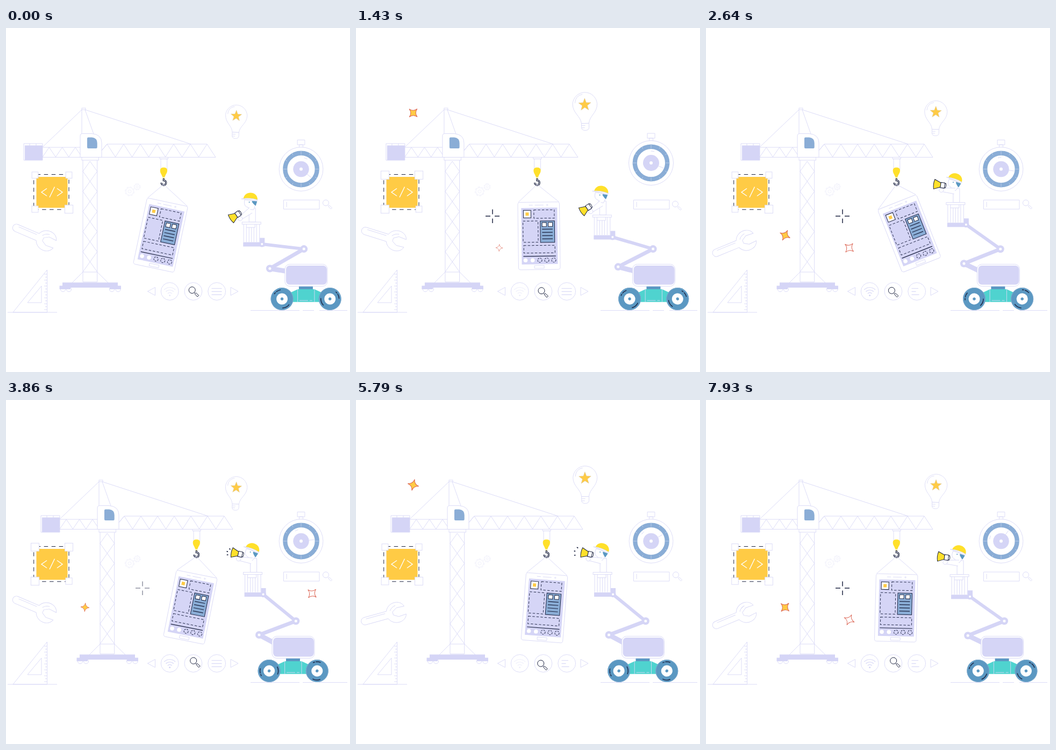
Write an HTML page that moves like this. It is 640 by 640 pixels and loops after 8000 ms.

```html
<!DOCTYPE html>
<html lang="en">
<head>
<meta charset="utf-8">
<title>Building an app</title>
<style>
html, body { margin: 0; width: 100%; height: 100%; overflow: hidden; background: #fff; }
svg { display: block; width: 100vw; height: 100vh; }
.l { fill: none; stroke: #d9d9f6; stroke-width: .9; }
.w { fill: #fff; stroke: #d9d9f6; stroke-width: .9; }
.f { fill: #d5d5f6; }
.b { fill: #8aadd6; }
.s { fill: #5b98c2; }
.n { fill: none; stroke: #1c2340; stroke-width: 1; }
.d { fill: none; stroke: #2b3150; stroke-width: 1; stroke-dasharray: 4.5 3; }
.pale { fill: none; stroke: #f0f0fb; stroke-width: .9; }
.spark { stroke: #dc6655; stroke-width: 1; }
</style>
</head>
<body>
<svg viewBox="0 0 640 640">
  <!-- set square -->
  <path class="l" d="M3 529H95M76.5 450L13 529H76.5ZM66 480L40 511H66Z"/>
  <path class="l" id="ruler"/>

  <!-- wrench -->
  <g id="wrench">
    <path class="w" d="M-17 -7H-60A7 7 0 0 0 -60 7H-17C-13 16 -4 20 5 18.5C12 17 16 13 17.5 7.5L3 8.5L-6 3V-3L3 -8.5L17.5 -7.5C16 -13 12 -17 5 -18.5C-4 -20 -13 -16 -17 -7Z"/>
    <path class="l" d="M-57 -3.5H-20M-10 -6Q-6 -12 2 -13"/>
  </g>

  <!-- code tile -->
  <rect x="56.5" y="277" width="58" height="57.5" fill="#ffcb45"/>
  <rect x="51.7" y="272.5" width="65.3" height="65.3" class="n" stroke-dasharray="7.5 6.5" stroke-dashoffset="-5"/>
  <path d="M76 298.5L66 305.5L76 312.5M90.5 295.5L81 315M95 298.5L105 305.5L95 312.5" fill="none" stroke="#fff" stroke-width="1.4"/>
  <g id="handles"></g>

  <!-- gears -->
  <g id="gearA"><circle r="8.5" class="pale" stroke-dasharray="4.2 2.5"/><circle r="7" class="pale"/><circle r="3" class="pale"/></g>
  <g id="gearB"><circle r="6" class="pale" stroke-dasharray="3 1.7"/><circle r="4.8" class="pale"/><circle r="2" class="pale"/></g>

  <!-- crane -->
  <g id="crane">
    <path class="l" d="M141 152L68 221.5M147 152L344 216M141 152V197M147 152L163 197"/>
    <rect class="w" x="141" y="149" width="7" height="3"/>
    <path class="l" d="M33 215H68V246H33ZM44 215V219M56 215V219M68 222H138M68 240.5H390M178 228L188 216H374L390 240.5"/>
    <rect class="f" x="35" y="218.5" width="33" height="27.5"/>
    <path class="l" id="truss"/>
    <path class="w" d="M138 240.5V201Q138 196.5 142.5 196.5H160Q178 198 178 214V240.5Z"/>
    <path class="b" d="M153 203.5H160Q169.5 204.5 169.7 214V222Q169.7 224 167.7 224H153Q151 224 151 222V205.5Q151 203.5 153 203.5Z"/>
    <rect class="w" x="141" y="240.5" width="31.5" height="5.5"/>
    <path class="l" d="M143 246V472.5H169.7V246M143 454H169.7M143 454L123 474M169.7 454L190 474"/>
    <g id="rollers"></g>
    <path class="f" d="M105 473.5H208V479.5H214V486H193V483H120V486H99.5V479.5H105Z"/>
  </g>
  <g id="trolley">
    <path class="w" d="M286 240.5H301.5V243.5H286ZM288 243.5H299.7V264H288Z"/>
    <path d="M286.7 265Q286.7 259.5 293.3 259.5Q300 259.5 300 265C300 270 297 272 295.5 277H291C289.5 272 286.7 270 286.7 265Z" fill="#ffe02a"/>
    <rect x="291.2" y="277" width="4" height="3" fill="#f3e9a0"/>
    <path class="n" id="hook" d="M293.3 280V283.5A4.4 4.4 0 1 1 289 287.8" style="stroke-width:3.2"/>
    <path d="M293.3 281V283.5A4.4 4.4 0 1 1 289.2 288" fill="none" stroke="#fff"/>
  </g>
  <path class="l" id="ropes"/>

  <!-- phone, pivot at its top centre -->
  <g id="phone">
    <rect class="w" x="-38.7" width="77.5" height="125.5" rx="4"/>
    <path class="l" d="M-18 5.5H-11M-7 5.5H9M-9 118H9V123H-9Z"/>
    <circle class="l" cx="16" cy="5.5" r="1.2"/>
    <rect class="f" x="-32.5" y="10.5" width="67" height="105"/>
    <rect class="n" x="-28.5" y="15" width="14" height="14" style="fill:#fff"/>
    <rect x="-24.5" y="19" width="6" height="6" fill="#ffcb45"/>
    <path class="d" d="M-9 14.5H29V30H-9ZM-29.5 35H-1.5V74.5H-29.5ZM-28.5 80.5H29.5V94.5H-28.5Z"/>
    <rect class="n" x="2.7" y="35" width="26.5" height="40" style="fill:#8aadd6"/>
    <path class="n" d="M6 38H14V45.5H6ZM17.5 38H25.5V45.5H17.5Z" style="fill:#fff"/>
    <path class="n" d="M6 50.5H25.5M6 56.5H25.5M6 62.5H25.5M6 68.5H25.5M-29.5 100.5H31" style="stroke-width:1.2"/>
    <circle cx="-25.5" cy="108" r="3.8" fill="#fff"/><circle cx="-12.3" cy="108" r="3.8" fill="#fff"/>
    <g class="d" style="stroke-dasharray:3 1.7"><circle cx="1" cy="108" r="4"/><circle cx="14" cy="108" r="4"/><circle cx="27" cy="108" r="4"/></g>
  </g>

  <g id="sparks"></g>
  <path class="n" id="cross" d="M241 350H250M258 350H267M254 337.5V346.5M254 354.5V363" style="stroke-width:1.5"/>

  <!-- navigation -->
  <path class="l" d="M277.5 482.5L263.5 490L277.5 497.5ZM418 482.5L432 490L418 497.5Z"/>
  <g class="w"><circle cx="304.7" cy="490" r="16.4"/><circle cx="348.4" cy="490" r="16.4"/><circle cx="392.2" cy="490" r="16.4"/></g>
  <g id="wifi"><path class="l" style="stroke-width:1.2" d="M300.7 494A5.6 5.6 0 0 1 308.7 494M297.5 490.5A10.2 10.2 0 0 1 311.9 490.5M294.3 487A14.8 14.8 0 0 1 315.1 487"/><circle class="f" cx="304.7" cy="497.5" r="1.5"/></g>
  <g id="lens"><circle class="n" r="6"/><path class="n" d="M4 4.5L5.5 6M5 7L7 5L12.5 10L10 12.5Z"/></g>
  <path class="l" id="menu" style="stroke-width:1.2"/>

  <!-- bulb, pivot at its foot -->
  <g id="bulb">
    <path class="w" d="M-7 -13C-8 -27 -22.5 -32 -22.5 -49A22.8 23 0 0 1 23 -49C23 -32 8 -27 7 -13Z"/>
    <path class="w" d="M-7 -13H7V-6Q7 0 0 0Q-7 0 -7 -6Z"/>
    <path class="l" d="M-7 -9H0M-7 -5H-1M-18 -51Q-17 -65 -4 -67"/>
    <path id="star" fill="#ffcb45" stroke="#d9c9a8" stroke-width=".6"/>
  </g>

  <!-- stopwatch -->
  <g id="watch">
    <path class="w" d="M-3.5 -46H3.5V-40H-3.5ZM-7 -55H7V-46H-7Z"/>
    <circle class="w" r="41.5"/>
    <circle r="30.2" fill="none" stroke="#8aadd6" stroke-width="8.4"/>
    <path id="ticks" stroke="#c5d3ee" stroke-width=".8"/>
    <circle class="f" r="15"/><circle r="3" fill="#fff"/>
    <path class="l" id="hand" d="M14 0H25M-9 -20A22 22 0 0 1 -3 -22"/>
  </g>

  <!-- search field -->
  <path class="l" d="M516.5 320H583V337H516.5ZM522 323.5V333"/>
  <g id="lensSmall"><circle class="l" r="5.5"/><path class="l" d="M4 4L5 5M4.5 6.5L6.5 4.5L11.5 9.5L9.5 11.5Z"/></g>

  <!-- lift -->
  <path class="l" d="M455 525.5H546M552 525.5H573M583 525.5H635"/>
  <g id="lift">
    <g fill="none" stroke="#d5d5f6">
      <path id="boomA" stroke-width="9"/><path id="boomB" stroke-width="7"/><path id="boomC" stroke-width="6"/>
    </g>
    <g id="joints"></g>
    <rect class="w" x="519" y="439.5" width="79" height="41" rx="9"/>
    <rect class="f" x="521" y="442" width="76" height="35.5" rx="7"/>
    <rect class="s" x="545" y="481" width="26" height="5.5"/>
    <path fill="#4fd3cf" d="M530 492L543 486H574L587 492V509.7H530Z"/>
    <path class="l" d="M542.7 486V509.7M574 486V509.7M546 507H562M565 507H570"/>
    <g id="wheelA"></g><g id="wheelB"></g>

    <!-- basket and worker, origin at the platform joint -->
    <g id="basket">
      <path class="w" d="M-24 -41V-64Q-23 -67 -19 -67H-12V-41Z"/>
      <g id="head">
        <path class="w" d="M-32 -83V-77Q-31 -70 -24 -69.5L-22 -66H-14L-12 -73V-83Z"/>
        <path class="s" d="M-18 -82L-8.5 -82L-10.5 -73.5Q-14 -75 -18 -80Z"/>
        <circle class="s" cx="-23" cy="-79.5" r="1"/>
        <path d="M-34.5 -85C-33 -101 -9 -101 -8 -85Z" fill="#ffe02a"/>
        <path class="w" d="M-38 -84.5Q-22 -88.5 -7.5 -84.5Q-8 -82.5 -12 -83Q-24 -85 -38 -84.5Z"/>
      </g>
      <g id="arm">
        <path class="w" d="M1 -5L-22 -2V5L0 6"/>
        <circle class="w" cx="-24.5" cy="2" r="4.2"/>
        <path class="n" style="fill:#ffe02a" d="M-39 -16Q-41.5 -7 -39 2L-27 -3V-11Z"/>
        <path class="n" style="fill:#fff" d="M-27 -12H-19.5V-2H-27ZM-19.5 -11H-17.5Q-16 -7 -17.5 -3H-19.5"/>
        <path class="n" id="sound" style="stroke-width:1.7" d="M-43 -12L-49.8 -14.6M-46.5 -7L-53.5 -6.7M-45 -1.4L-51.5 1.1"/>
      </g>
      <path class="l" d="M-34 -37V-4M-29 -37V-4M-24 -31V-4M-19.5 -31V-4M-15 -31V-4M-10 -37V-4M-4.5 -37V-4M-29 -31H-13V-37"/>
      <rect class="w" x="-37" y="-41" width="35" height="4"/>
      <path class="f" d="M-35 -3.5H-4V-11.5H5V4.5H-35Z"/>
      <circle r="5.5" class="f"/><circle r="2" fill="#fff"/>
    </g>
  </g>
</svg>
<script>
const LOOP = 8000, RAD = Math.PI / 180, TURN = 2 * Math.PI;
const $ = id => document.getElementById(id);
const set = (el, name, value) => (typeof el === 'string' ? $(el) : el).setAttribute(name, value);
const place = (el, x, y, angle = 0, scale = 1) =>
  set(el, 'transform', `translate(${x} ${y}) rotate(${angle}) scale(${scale})`);
const range = n => [...Array(n).keys()];
const polar = (r, deg) => [r * Math.cos(deg * RAD), r * Math.sin(deg * RAD)];
const add = (p, q) => [p[0] + q[0], p[1] + q[1]];
const line = (...points) => 'M' + points.join('L');

// Motion rules
const mix = (a, b, u) => a + (b - a) * u;
const clamp = u => Math.min(1, Math.max(0, u));
const smooth = u => (u = clamp(u), u * u * (3 - 2 * u));
const ease = (t, from, to) => smooth((t - from) / (to - from));
const bump = (t, peak, reach) => smooth(1 - Math.abs(t - peak) / reach);
const wave = (t, period, peak) => Math.cos(TURN * (t - peak) / period);

// Repeated still parts
set('ruler', 'd', range(13).map(i => `M${i % 2 ? 73 : 71} ${458 + i * 5.5}H76.5`).join(''));
const zigzag = (count, point) => line(...range(count).map(i => point(i, i % 2)));
set('truss', 'd', 'M178 228L188 216' +
  zigzag(7, (i, odd) => [68 + i * 12.2, odd ? 222 : 240]) +
  zigzag(13, (i, odd) => [188 + i * 15.5, odd ? 240 : 216]) +
  zigzag(12, (i, odd) => [odd ? 143 : 156.3, 248 + i * 18.7]) +
  zigzag(12, (i, odd) => [odd ? 169.7 : 156.3, 248 + i * 18.7]));
$('rollers').innerHTML = [106, 117, 197, 208.5].map(x => `<circle class="w" cx="${x}" cy="486" r="4.6"/>`).join('');
set('star', 'd', line(...range(10).map(i => add([0, -47.5], polar(i % 2 ? 5 : 12, i * 36 - 90)))) + 'Z');
set('ticks', 'd', range(12).map(i => line(polar(i % 3 ? 30.5 : 27, i * 30), polar(34, i * 30))).join(''));

const arc = (r, from, to) => `M${polar(r, from)}A${r} ${r} 0 0 1 ${polar(r, to)}`;
const wheel = start => `<circle class="s" r="21"/><circle r="20.5" fill="none" stroke="#86aed0" stroke-width=".8"/>
  <path class="n" style="stroke-width:1.4" d="${arc(17, start, start + 50) + arc(17, start + 174, start + 187) + arc(17, start + 192, start + 224)}"/>
  <circle r="10.5" fill="#fff"/><circle class="s" r="2.7"/>`;
$('wheelA').innerHTML = wheel(38);
$('wheelB').innerHTML = wheel(135);
$('joints').innerHTML = '<g><circle class="f" r="7"/><circle r="2.5" fill="#fff"/></g>'.repeat(2);
const [jointA, jointB] = $('joints').children;
$('handles').innerHTML = '<rect class="w"/>'.repeat(4);

const sparks = [
  { x: 106.5, y: 158, fill: '#ffcb45', peaks: [1250, 5990, 7050] },
  { x: 147, y: 385.7, fill: '#ffcb45', peaks: [2680, 4170, 7770] },
  { x: 266.5, y: 409, fill: '#fff', peaks: [1770, 2515, 6990, 8000] },
  { x: 569.5, y: 360, fill: '#fff', peaks: [3710] }
];
$('sparks').innerHTML = sparks.map(s =>
  `<path class="spark" fill="${s.fill}" d="M0 -10.5Q1.4 -1.4 10.5 0Q1.4 1.4 0 10.5Q-1.4 1.4 -10.5 0Q-1.4 -1.4 0 -10.5Z"/>`).join('');

function drawCrane(t) {
  const arrival = clamp(t / 2000), release = 2640, since = t - release;
  const hook = 293.3 + 61 * arrival, phoneX = mix(300.5, 355.2, arrival);
  const swing = since < 0
    ? mix(12, -21.5, ease(t, 560, release))
    : -21.5 * Math.exp(-since / 2090) * wave(since, 2200, 0);
  place('crane', 32 * arrival, 0);
  place('trolley', 61 * arrival, 0);
  place('phone', phoneX, 324, swing);
  const [cx, cy] = polar(38, swing);
  set('ropes', 'd', line([phoneX - cx, 324 - cy], [hook, 291], [phoneX + cx, 324 + cy]));
}

function drawLift(t) {
  const move = -13.5 * (1 + wave(t, 9400, 4870));
  const rise = ease(t, 400, 3250) - ease(t, 7200, 10600);
  const a = [mix(491, 495, rise), mix(447.5, 437, rise)];
  const b = add(a, polar(73, mix(-29.9, -20.6, rise)));
  const c = add(b, polar(78.5, mix(186.6, 219.3, rise)));
  place('lift', move, 0);
  set('boomA', 'd', line([525, 453], a));
  set('boomB', 'd', line(a, b));
  set('boomC', 'd', line(b, c));
  place(jointA, ...a);
  place(jointB, ...b);
  place('basket', ...c);
  place('wheelA', 513.6, 504, move / 21 / RAD);
  place('wheelB', 602.8, 504, move / 21 / RAD);

  set('head', 'transform', `translate(-.5 1.5) rotate(${4 + 16 * rise} -21 -81)`);
  place('arm', -21.5, -63, mix(-34, 12, ease(t, 1500, 2900)) - 5 * ease(t, 7200, 8000));
  const beat = (t + 420) / 700 % 1, part = Math.sin(Math.PI * beat);
  set('sound', 'visibility', t > 3080 && t < 7280 ? 'visible' : 'hidden');
  set('sound', 'stroke-dasharray', `${7.3 * part} 30`);
  set('sound', 'stroke-dashoffset', beat < .5 ? 0 : -7.3 * (1 - part));
}

function drawTools(t) {
  place('wrench', 74.5, 395.5, 24 * Math.tanh(2 * Math.sin(Math.PI * (1650 - Math.max(t, 930)) / 1440)));

  const beat = wave(t, 2750, 1430);
  [beat, beat, wave(t, 2450, 1430), -beat].forEach((pulse, i) => {
    const size = 13.5 + 1.8 * pulse, box = $('handles').children[i];
    set(box, 'x', (i % 2 ? 117 : 54) - size / 2);
    set(box, 'y', (i < 2 ? 273.7 : 337) - size / 2);
    set(box, 'width', size);
    set(box, 'height', size);
  });

  place('gearA', 230, 304, t * .045);
  place('gearB', 244, 295.5, -t * .06);

  sparks.forEach(({ x, y, peaks }, i) => {
    const peak = peaks.reduce((a, b) => Math.abs(t - a) < Math.abs(t - b) ? a : b);
    place($('sparks').children[i], x, y, 30 + (t - peak) * .08, clamp(1.8 * bump(t, peak, 560)));
  });
  set('cross', 'opacity', clamp(.5 + 3 * wave(t, 5300, 2535)));

  const lift = wave(t, 3800, 1550), size = .94 + .065 * lift;
  place('bulb', 426.7, 131 - 13 * lift + 72 * size, .6 - 2 * lift, size);

  const hop = bump(t % 5500, 1430, 760);
  place('watch', 549, 262.5 - 11.5 * hop, 0, .985 + .015 * hop);
  set('hand', 'transform', `rotate(${40 - t * .012})`);
  place('lensSmall', 595 - hop, 325.3 + 2.2 * hop);
}

function drawNav(t) {
  set('wifi', 'opacity', .4 + .6 * clamp(.5 + 2 * wave(t, 4400, 3200)));
  const drift = 2.5 * ease(t, 0, 2600) * wave(t, 4070, 3860);
  place('lens', 346.2 + drift, 487.6 - drift);
  const shrink = ease(t, 1430, 2200) * clamp(1.5 * wave(t, 2750, 2805));
  set('menu', 'd', [12.5, 8, 14].map((short, i) =>
    `M382.5 ${484.5 + i * 5.8}h${mix(19, short, shrink)}`).join(''));
}

const start = performance.now();
function frame() {
  const t = (performance.now() - start) % LOOP;
  drawCrane(t);
  drawLift(t);
  drawTools(t);
  drawNav(t);
  requestAnimationFrame(frame);
}
frame();
</script>
</body>
</html>
```
